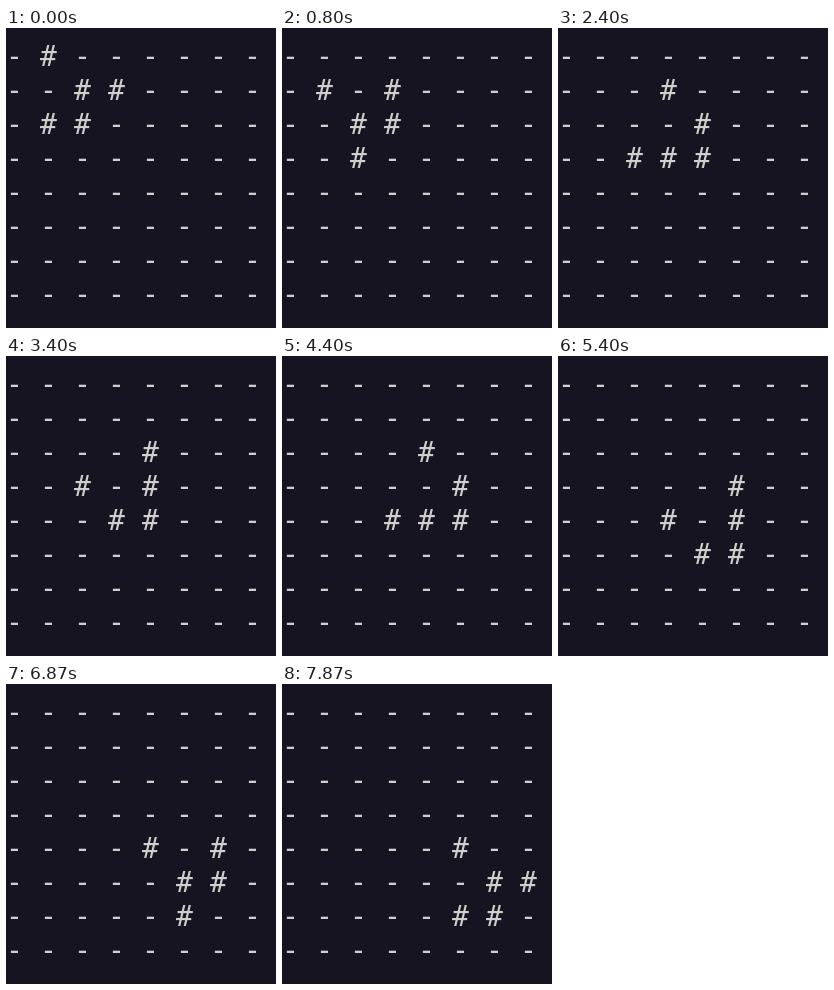
An HTML page with a canvas that plays this animation: 270x300 px, repeating every 8.27 s.

```html
<!DOCTYPE html>
<html lang="en">
<head>
<meta charset="utf-8">
<title>Glider</title>
<style>
  html, body { margin: 0; width: 100%; height: 100%; overflow: hidden; background: #171421; }
  canvas { display: block; }
</style>
</head>
<body>
<canvas id="stage" width="270" height="300"></canvas>
<script>
const SIZE = 8, PITCH = 34, LOOP = 8270;
const STEPS = [330, 800, 1330, 1800, 2400, 2870, 3400, 3870,
               4400, 4870, 5400, 5870, 6400, 6870, 7400, 7870];
const ctx = document.getElementById('stage').getContext('2d');

function nextGeneration(grid) {
  const alive = (r, c) => grid[r]?.[c] ? 1 : 0;
  return grid.map((row, r) => row.map((cell, c) => {
    let n = -alive(r, c);
    for (let dr = -1; dr <= 1; dr++)
      for (let dc = -1; dc <= 1; dc++) n += alive(r + dr, c + dc);
    return n === 3 || (cell && n === 2);
  }));
}

const seed = ['.#', '..##', '.##'];
const generations = [Array.from({ length: SIZE }, (_, r) =>
  Array.from({ length: SIZE }, (_, c) => seed[r]?.[c] === '#'))];
for (const _ of STEPS) generations.push(nextGeneration(generations.at(-1)));

function draw(grid) {
  ctx.fillStyle = '#171421';
  ctx.fillRect(0, 0, 270, 300);
  ctx.fillStyle = '#d0cfcc';
  ctx.font = '28px "DejaVu Sans Mono", monospace';
  grid.forEach((row, r) => row.forEach((cell, c) =>
    ctx.fillText(cell ? '#' : '-', c * PITCH, 38 + r * PITCH)));
}

const start = performance.now();
let shown = -1;
function frame() {
  const t = (performance.now() - start) % LOOP;
  const gen = STEPS.filter(s => s <= t).length;
  if (gen !== shown) draw(generations[shown = gen]);
  requestAnimationFrame(frame);
}
frame();
</script>
</body>
</html>
```
